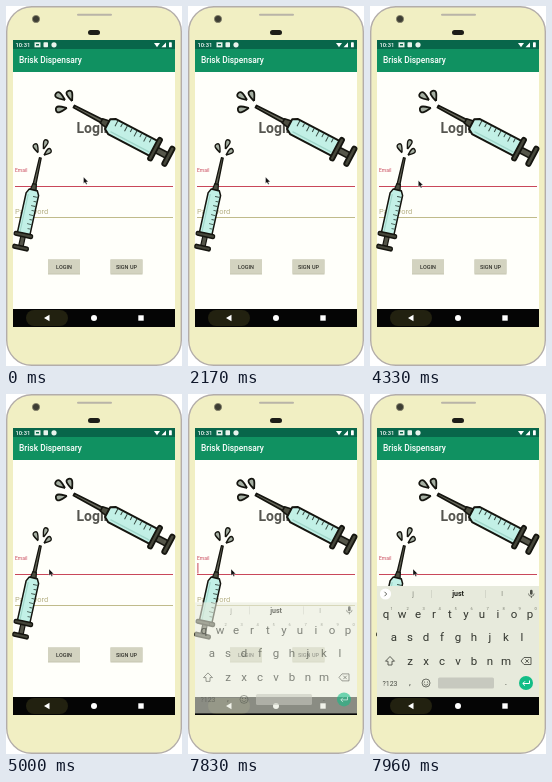
Animation, 176 px wide and 360 px high, one loop 8 s. Source, as an HTML page with a canvas:

```html
<!DOCTYPE html>
<html lang="en">
<head>
<meta charset="utf-8">
<title>Login screen</title>
<style>
  html, body { margin: 0; width: 100%; height: 100%; overflow: hidden; background: #fff; }
  canvas { display: block; width: 176px; height: 360px; }
</style>
</head>
<body>
<canvas id="stage"></canvas>
<script>
const W = 176, H = 360, LOOP = 8000;
const canvas = document.getElementById('stage');
const ctx = canvas.getContext('2d');
const dpr = window.devicePixelRatio || 1;
canvas.width = W * dpr;
canvas.height = H * dpr;

const INK = '#15150f', RED = '#c9475a', KEYS = '#e7eadc', GREY = '#4c4f47';
const clamp = v => Math.max(0, Math.min(1, v));
const easeInOut = p => p * p * (3 - 2 * p);

function rect(x, y, w, h, color) {
  ctx.fillStyle = color;
  ctx.fillRect(x, y, w, h);
}

function round(x, y, w, h, r, fill, stroke, line = 1) {
  ctx.beginPath();
  ctx.roundRect(x, y, w, h, r);
  paint(fill, stroke, line);
}

function disc(x, y, r, fill, stroke, line = 1) {
  ctx.beginPath();
  ctx.arc(x, y, r, 0, Math.PI * 2);
  paint(fill, stroke, line);
}

function poly(points, fill, stroke, line = 1, close = true) {
  ctx.beginPath();
  for (let i = 0; i < points.length; i += 2) ctx.lineTo(points[i], points[i + 1]);
  if (close) ctx.closePath();
  paint(fill, stroke, line);
}

function paint(fill, stroke, line) {
  if (fill) { ctx.fillStyle = fill; ctx.fill(); }
  if (stroke) { ctx.strokeStyle = stroke; ctx.lineWidth = line; ctx.stroke(); }
}

function text(str, x, y, size, color, weight = 400, align = 'left') {
  ctx.font = `${weight} ${size}px Roboto, sans-serif`;
  ctx.textAlign = align;
  ctx.fillStyle = color;
  ctx.fillText(str, x, y);
}

function phone() {
  rect(0, 0, W, H, '#fff');
  round(0.7, 0.7, 174.6, 358.6, 25, '#f1efc3', '#b3adaa', 1.4);
  disc(30, 13, 3.6, '#3d3d34', '#85826a', 0.8);
  round(71, 7.8, 35, 2, 1, '#b9b4a8');
  round(82, 24, 12, 5, 2.5, '#1d1d18');
}

function bars() {
  rect(7, 34, 162, 9, '#08664a');
  text('10:31', 9.5, 40.8, 5.8, '#fff', 500);
  rect(28.5, 36.3, 6, 5, '#e8f3ec');
  rect(30, 38, 3, 1.5, '#08664a');
  round(37.5, 36.3, 4.5, 5, 0.8, '#e8f3ec');
  disc(48, 38.8, 2.6, '#e8f3ec');
  poly([148, 37, 154, 37, 151, 41.3], '#fff');
  poly([155.5, 41.2, 160, 41.2, 160, 36.5], '#fff');
  round(163, 36.3, 2.8, 5, 0.6, '#fff');
  rect(7, 43, 162, 23, '#109161');
  text('Brisk Dispensary', 13, 57, 8.4, '#fff', 500);
}

function navBar() {
  rect(7, 303, 162, 18, '#050505');
  round(20, 304, 42, 16, 8, '#222110');
  poly([38, 312, 43.5, 308.8, 43.5, 315.2], '#fff');
  disc(88, 312, 3, '#fff');
  rect(132.3, 309.3, 5.4, 5.4, '#fff');
}

function button(x, label) {
  rect(x, 253.5, 32, 15, '#c6c5b2');
  rect(x, 253.5, 32, 14, '#d3d3c0');
  text(label, x + 16, 262.7, 5.5, '#33332c', 500, 'center');
}

function form(caret) {
  text('Login', 70.5, 127, 14, '#55554f', 700);
  text('Email', 9, 166, 5, RED);
  rect(9, 180, 158, 1, RED);
  if (caret) rect(9.4, 169, 1, 10.5, RED);
  text('Password', 9, 208.3, 7.5, '#b5b084');
  rect(9, 211, 158, 0.9, '#b9b47f');
  button(42, 'LOGIN');
  button(104.5, 'SIGN UP');
}

// Teardrop whose point faces the needle tip.
function drop(x, y, size) {
  ctx.save();
  ctx.translate(x, y);
  ctx.rotate(Math.atan2(-y, -x));
  ctx.beginPath();
  ctx.moveTo(size, 0);
  ctx.bezierCurveTo(size * 0.3, -size * 0.3, -size, -size, -size, 0);
  ctx.bezierCurveTo(-size, size, size * 0.3, size * 0.3, size, 0);
  paint('#a5afa2', INK, 1.8);
  ctx.restore();
}

// Tip at the origin, plunger along +x.
function syringe(x, y, angle, sx, sy) {
  ctx.save();
  ctx.translate(x, y);
  ctx.rotate(angle * Math.PI / 180);
  ctx.scale(sx, sy);
  ctx.lineJoin = 'round';
  drop(-16.5, -2.3, 5.6);
  drop(-8.2, -7.6, 5.4);
  drop(-10, 8, 5.6);
  poly([0, -1.2, 33, -1.9, 33, 1.9, 0, 1.2], '#66675a', INK, 1.8);
  poly([31, -2.4, 39, -4, 39, 4, 31, 2.4], '#4c4d40', INK, 1.6);
  round(92, -3, 14, 6, 1, '#55564a', INK, 1.6);
  poly([38, -5.5, 43, -8.5, 91, -8.5, 91, 8.5, 43, 8.5, 38, 5.5], '#c2f0e6', INK, 2);
  for (let i = 0; i < 8; i++) {
    rect(45 + i * 5.4, -7.6, 1, i % 2 ? 4 : 6, '#33473f');
  }
  rect(44, 4.6, 44, 1.4, '#a0d6ca');
  round(89.5, -12.5, 4.2, 25, 2, '#45463a', INK, 1.8);
  round(104.5, -10.5, 4.4, 21, 2, '#45463a', INK, 1.8);
  ctx.restore();
}

function pointer(t) {
  const p = easeInOut(clamp((t - 3940) / 520));
  ctx.save();
  ctx.translate(77.5 - 34.5 * p, 171 + 4 * p);
  poly([0, 0, 0, 6.6, 1.5, 5.3, 2.6, 7.6, 3.7, 7.1, 2.7, 4.9, 4.7, 4.7], '#111', '#fff', 0.35);
  ctx.restore();
}

function keyRow(letters, x, y) {
  [...letters].forEach((c, i) => text(c, x + i * 16, y, 11.5, '#33362f', 400, 'center'));
}

function suggestions(settled) {
  if (settled) {
    disc(15.5, 200, 5.6, '#fff');
    poly([14.5, 197.8, 16.7, 200, 14.5, 202.2], null, GREY, 0.9, false);
  }
  rect(61, 196, 0.6, 8, '#c6c8bc');
  rect(115, 196, 0.6, 8, '#c6c8bc');
  text('j', 43, 202.4, 7, '#85887c', 400, 'center');
  text('just', 88, 202.4, 7, '#1d1f18', 700, 'center');
  text('l', 132, 202.4, 7, '#85887c', 400, 'center');
  round(160, 195.8, 2.6, 5, 1.3, GREY);
  ctx.beginPath();
  ctx.arc(161.3, 199.5, 2.8, 0, Math.PI);
  paint(null, GREY, 0.7);
  rect(160.9, 202, 0.8, 2, GREY);
}

function keyboard(settled) {
  rect(7, 192, 162, 111, KEYS);
  suggestions(settled);
  keyRow('qwertyuiop', 16, 223.5);
  [...'1234567890'].forEach((n, i) => text(n, 21.5 + i * 16, 215.5, 4, '#777a6e', 400, 'center'));
  keyRow('asdfghjkl', 24, 247);
  keyRow('zxcvbnm', 40, 270.5);

  poly([20, 262.5, 24.5, 267.2, 22, 267.2, 22, 271, 18, 271, 18, 267.2, 15.5, 267.2], null, GREY, 0.9);
  poly([151, 267, 154, 263.5, 161, 263.5, 161, 270.5, 154, 270.5], null, GREY, 0.9);
  poly([155.3, 265.3, 158.8, 268.8], null, GREY, 0.9, false);
  poly([158.8, 265.3, 155.3, 268.8], null, GREY, 0.9, false);

  text('?123', 20, 291.6, 7, GREY, 400, 'center');
  text(',', 40, 291, 9, GREY, 400, 'center');
  disc(56, 289, 4, null, GREY, 0.8);
  disc(54.5, 288, 0.6, GREY);
  disc(57.5, 288, 0.6, GREY);
  ctx.beginPath();
  ctx.arc(56, 289, 2.2, 0.3, Math.PI - 0.3);
  paint(null, GREY, 0.7);
  round(68, 283.5, 56, 11, 1.5, '#c7c9bf');
  text('.', 136, 291, 9, GREY, 400, 'center');
  disc(156, 289, 7, '#12bd86');
  poly([159.5, 286.5, 159.5, 289.5, 153, 289.5], null, '#fff', 1, false);
  poly([155, 287.3, 152.8, 289.5, 155, 291.7], null, '#fff', 1, false);
}

function slideKeyboard(t) {
  if (t < 7750) return;
  const p = clamp((t - 7730) / 220);
  ctx.save();
  ctx.beginPath();
  ctx.rect(7, 34, 162, 287);
  ctx.clip();
  ctx.globalAlpha = clamp(p * 1.28);
  ctx.translate(0, 56 * (1 - p) ** 2);
  keyboard(p === 1);
  ctx.restore();
}

function draw(t) {
  ctx.setTransform(dpr, 0, 0, dpr, 0, 0);
  phone();
  rect(7, 66, 162, 238, '#fffffa');
  bars();
  form(t >= 420 && (t - 420) % 1000 < 500);
  syringe(68, 100.5, 27.8, 1, 1);
  syringe(34.3, 152, 102.4, 0.86, 0.75);
  navBar();
  slideKeyboard(t);
  pointer(t);
}

function frame(now) {
  draw(now % LOOP);
  requestAnimationFrame(frame);
}
requestAnimationFrame(frame);
</script>
</body>
</html>
```
